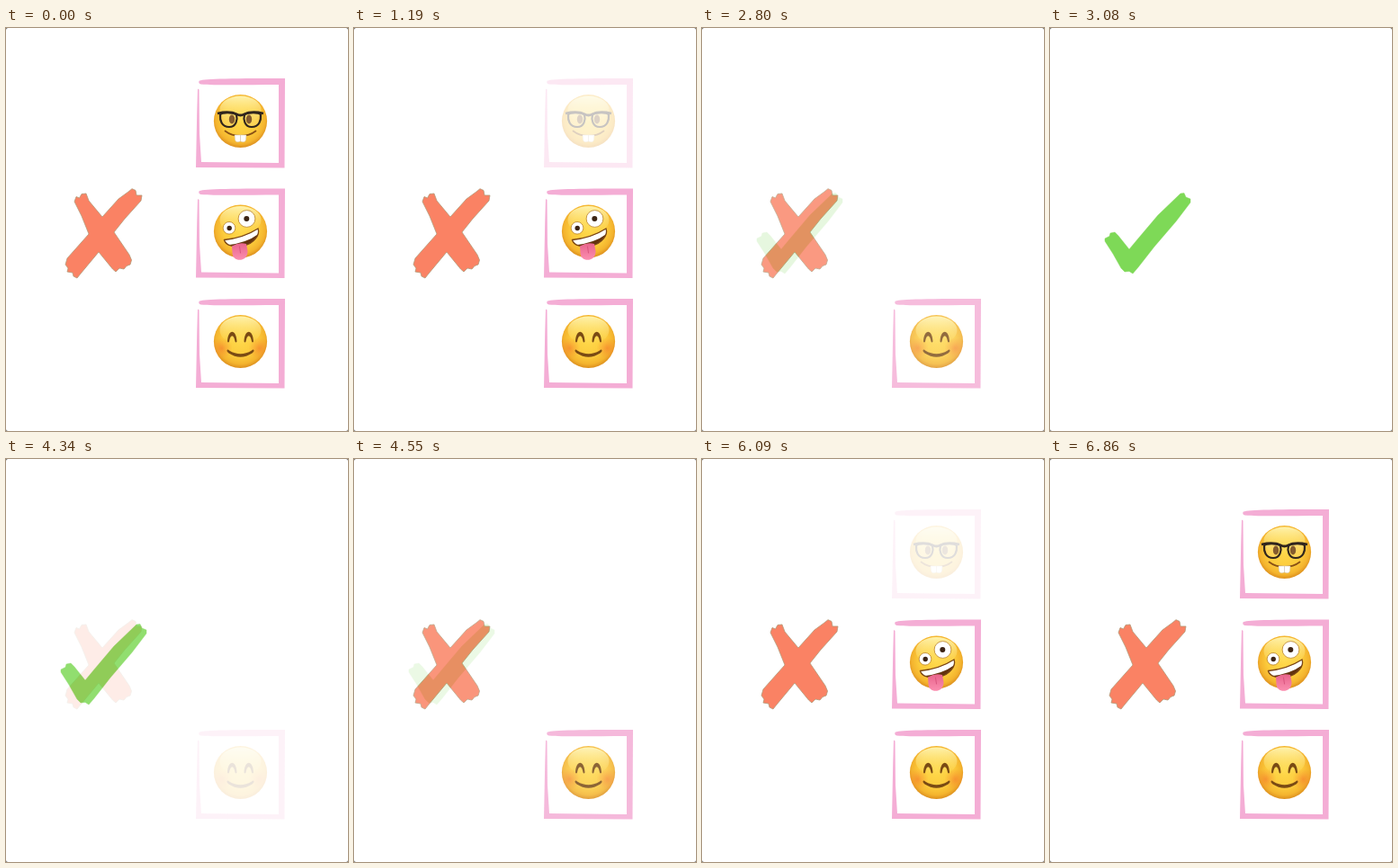
Write an HTML page that moves like this. It is 380 by 448 pixels and loops after 6.93 s.

```html
<!DOCTYPE html>
<html lang="en">
<head>
<meta charset="utf-8">
<title>Emoji elimination</title>
<style>
html, body { margin: 0; width: 100%; height: 100%; overflow: hidden; background: #fff; }
svg { display: block; width: 100vw; height: 100vh; }
</style>
</head>
<body>
<svg viewBox="0 0 380 448">
  <defs>
    <radialGradient id="skin" cx=".5" cy=".46" r=".55">
      <stop offset="0" stop-color="#ffd94b"/>
      <stop offset=".6" stop-color="#fccb3c"/>
      <stop offset=".84" stop-color="#f4b42e"/>
      <stop offset="1" stop-color="#d98a1c"/>
    </radialGradient>
    <linearGradient id="shine" x2="0" y2="1">
      <stop offset="0" stop-color="#fff6b4" stop-opacity=".95"/>
      <stop offset="1" stop-color="#ffe573" stop-opacity="0"/>
    </linearGradient>
    <radialGradient id="blush">
      <stop offset="0" stop-color="#f5762c" stop-opacity=".6"/>
      <stop offset="1" stop-color="#f5862c" stop-opacity="0"/>
    </radialGradient>
    <linearGradient id="tongue" x2="0" y2="1">
      <stop offset="0" stop-color="#e8648c"/>
      <stop offset="1" stop-color="#fb8eb0"/>
    </linearGradient>
    <path id="mouth" d="M-18 9.500Q3 7.500 19.500 -3C22 4 15 13.500 4 16C-6 18 -16.500 16.500 -18 9.500Z"/>
    <clipPath id="grin"><use href="#mouth"/></clipPath>
    <clipPath id="face"><circle r="29.600"/></clipPath>
    <g id="card">
      <path fill="#f4add5" d="M-46 -44.500C-44 -47 -18 -47.500 49.500 -47.500L49 52L-49.500 51.500L-48.300 -8L-47.500 -36L-46 -35L-45.500 14L-43.500 45.500L42.500 46.500V-40.500C10 -40.500 -25 -39.500 -44 -41Q-47 -42 -46 -44.500Z"/>
      <circle r="29.600" fill="url(#skin)"/>
      <ellipse cy="-12.500" rx="23" ry="15.500" fill="url(#shine)"/>
    </g>
  </defs>

  <path fill="#666" d="M0 0H380V448H0Z"/>
  <rect width="380" height="448" rx="2.500" fill="#fff"/>

  <path fill="#fa8264" stroke="#b39a78" stroke-width=".8" stroke-linejoin="round"
    d="M76 193L78 187.500L81.500 189L84 184.500L89 184L92 192L107 210L125 190L136 182L140 178.700L144 180.500L145 186L151 186L150 192L132 212L120 227L137 252L139.500 258L138 263L134 264.500L131 268L126 267L122 271L118.500 268L103 249L83 273L79 278L75 276L74 272L68 271L69 267L66 263L68 256L92 229L84 209Z"/>

  <g id="check">
    <path fill="#fff" d="M55 170H165V285H55Z"/>
    <path fill="#7ed957" stroke="#c9ecb6" stroke-width="1" stroke-linejoin="round" paint-order="stroke"
      d="M61 234L66 231.500L67 228L72 227L76 231L88 246L98 234L120 208L145 184L149 183.500L151 188L156 190L156 194L140 215L116 243L98 266L92 273L88 270.500L83 271L79 267L70 251L61 237Z"/>
  </g>

  <g id="nerd" transform="translate(260.5 103.500)">
    <use href="#card"/>
    <g fill="#744512">
      <ellipse cx="-9.500" cy="-2" rx="3.200" ry="5"/>
      <ellipse cx="9.500" cy="-2" rx="3.200" ry="5"/>
    </g>
    <g fill="#fff" fill-opacity=".12" stroke="#30251d" stroke-width="2.200" stroke-linejoin="round">
      <path id="lens" d="M-22.500 -7C-21 -10.500 -6 -10 -4.500 -7C-3 -2 -4.500 6.500 -12.500 6.500C-21 6.500 -23 -1 -22.500 -7Z"/>
      <use href="#lens" transform="scale(-1 1)"/>
      <path fill="none" stroke-width="2.800" d="M-25.500 -8.500Q-12 -11.500 -4 -7.500Q0 -5.500 4 -7.500Q12 -11.500 25.500 -8.500"/>
    </g>
    <path fill="none" stroke="#8a5115" stroke-width="1.800" stroke-linecap="round" d="M-17 11Q-10 16.500 0 16.500T17 11"/>
    <path fill="#fff" stroke="#cfc2b0" stroke-width=".5" d="M-6.500 15.500H0V22.500Q-5 24.500 -6 21ZM0 15.500H6.500L6 21Q5 24.500 0 22.500Z"/>
  </g>

  <g id="zany" transform="translate(260.5 226)">
    <use href="#card"/>
    <g fill="#fff" stroke="#b98227" stroke-width=".8">
      <circle cx="7" cy="-14" r="9.400"/>
      <circle cx="-12.500" cy="-3.700" r="6.800"/>
    </g>
    <g fill="#3c2415">
      <circle cx="6.800" cy="-14" r="3"/>
      <circle cx="-12.300" cy="-3.500" r="2.700"/>
    </g>
    <g clip-path="url(#grin)">
      <path fill="#63330f" d="M-20 -5H24V22H-20Z"/>
      <path fill="#fff" d="M-19 9Q4 8 20 -4L20 3Q6 13.500 -16 15.500Z"/>
    </g>
    <use href="#mouth" fill="none" stroke="#7b4715" stroke-width="1.300"/>
    <path fill="url(#tongue)" d="M-9.500 16.500Q-1 11.500 6.500 14L8 22C8.500 34.500 -9 35 -9 24Z"/>
    <path fill="none" stroke="#d9557e" stroke-width="1" stroke-linecap="round" d="M-1 17L0 24"/>
  </g>

  <g id="smile" transform="translate(260.5 348.500)">
    <use href="#card"/>
    <g fill="url(#blush)" clip-path="url(#face)">
      <circle cx="-21" cy="7.500" r="12"/>
      <circle cx="21" cy="7.500" r="12"/>
    </g>
    <g fill="#7a4b14">
      <path id="eye" d="M-14.500 0C-14 -14.500 -4.500 -14.500 -4 0Q-5 2 -6 0C-7.500 -8.500 -11 -8.500 -12.500 0Q-13.500 2 -14.500 0Z"/>
      <use href="#eye" transform="scale(-1 1)"/>
      <path d="M-15 9.500Q-14 8.500 -12.500 10Q0 17.500 12.500 10Q14 8.500 15 9.500Q15.500 11 13 13Q0 21.500 -13 13Q-15.500 11 -15 9.500Z"/>
    </g>
  </g>
</svg>
<script>
const LOOP = 6930, STEP = 70, FADE = 300;
// When each part appears and disappears within the loop
const parts = {
  nerd: { hide: 970, show: 6045 },
  zany: { hide: 1740, show: 5245 },
  smile: { hide: 2745, show: 4295 },
  check: { show: 2745, hide: 4295 }
};
const nodes = Object.fromEntries(Object.keys(parts).map(id => [id, document.getElementById(id)]));
const ramp = (t, start) => Math.min(1, Math.max(0, (t - start) / FADE));

function draw(ms) {
  const t = Math.floor((ms % LOOP) / STEP) * STEP;
  for (const [id, { show, hide }] of Object.entries(parts)) {
    const initial = hide < show ? 1 : 0;
    nodes[id].style.opacity = initial + ramp(t, show) - ramp(t, hide);
  }
}

let start;
function tick(now) {
  start ??= now;
  draw(now - start);
  requestAnimationFrame(tick);
}
draw(0);
requestAnimationFrame(tick);
</script>
</body>
</html>
```
